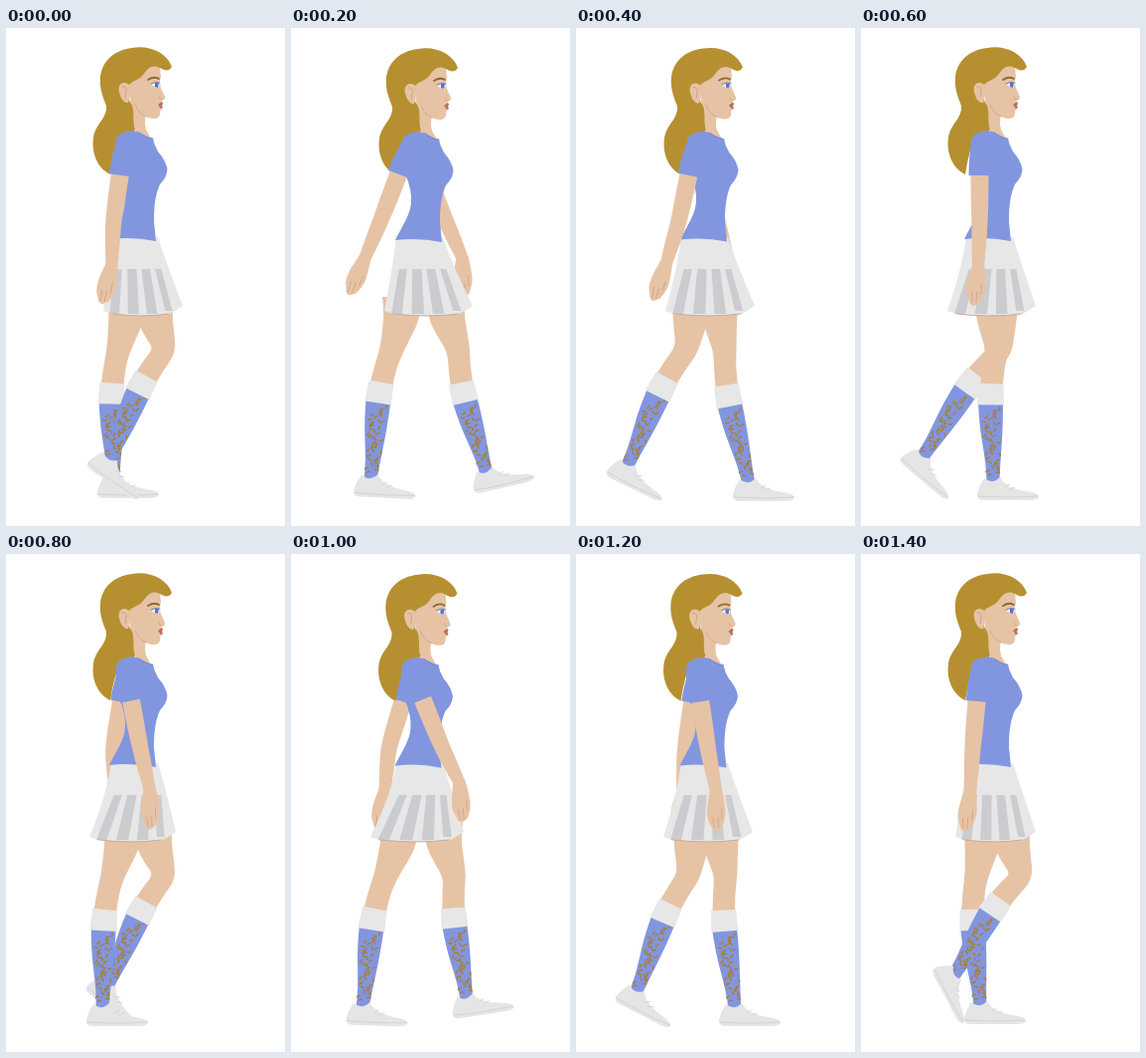
Recreate the animation shown at these times as an HTML page with a canvas. Size 281 by 500 pixels, loop 1.6 s.

```html
<!DOCTYPE html>
<html lang="en">
<head>
<meta charset="utf-8">
<title>Walk cycle</title>
<style>
html, body { margin: 0; width: 100%; height: 100%; overflow: hidden; background: #fff; }
canvas { display: block; width: 281px; height: 500px; }
</style>
</head>
<body>
<canvas id="stage" width="281" height="500"></canvas>
<script>
const ctx = document.getElementById('stage').getContext('2d');
const STEP = 200, COUNT = 8;
const SKIN = '#e7c3a5', SKIN_LINE = '#c79f80', BLUE = '#8296e0', HAIR = '#b69030';
const WHITE = '#e7e7e7', PLEAT = '#cbcbd0', GOLD = '#a5803a';

// Leg poses: hip x, knee x, ankle x, ankle y, foot angle
const nearLeg = [
  [149, 160, 103, 435, 35], [156, 169, 197, 448, -13],
  [144, 150, 174, 458, 0], [134, 137, 133, 457, 0],
  [118, 107, 97, 457, 0], [109, 95, 72, 456, 2],
  [117, 113, 60, 441, 27], [151, 162, 93, 424, 62]
];
const farLeg = [
  [122, 113, 108, 455, 0], [112, 101, 80, 454, 3],
  [116, 111, 51, 441, 26], [139, 141, 61, 432, 40],
  [148, 160, 102, 434, 38], [153, 165, 177, 448, -9],
  [145, 151, 160, 457, 0], [123, 116, 120, 455, 0]
];
// Arm poses: angles of upper arm, forearm and hand, forward positive
const nearArm = [
  [-8, -2, -13], [-21, -23, -22], [-12, -17, -18], [0, -2, -5],
  [11, 13, 2], [22, 26, 6], [9, 11, 2], [-5, -3, -7]
];
const farArm = [
  [4, 6, 0], [23, 24, 3], [14, 15, 4], [3, 4, 0],
  [-10, 3, 0], [-17, -5, -9], [-9, -3, -6], [-2, 2, 0]
];
const hems = [[98, 178], [94, 183], [90, 180], [87, 176], [84, 171], [80, 174], [88, 178], [95, 176]];
const bob = [0, 1, 0.6, 0, 0, 0.7, 0.6, 0];
const sway = [0, 1, 1, 0, 0, 0.5, 0.5, 0];

const rad = a => a * Math.PI / 180;

function fill(path, color) {
  ctx.fillStyle = color;
  ctx.fill(typeof path === 'string' ? new Path2D(path) : path);
}

function line(d, color, width) {
  ctx.strokeStyle = color;
  ctx.lineWidth = width;
  ctx.lineCap = ctx.lineJoin = 'round';
  ctx.stroke(new Path2D(d));
}

function at(x, y, angle, draw) {
  ctx.save();
  ctx.translate(x, y);
  ctx.rotate(rad(angle));
  draw();
  ctx.restore();
}

// Smooth strip through [x, y, width] points
function limb(pts, color) {
  const edge = sign => pts.map(([x, y, w], i) => {
    const a = pts[Math.max(i - 1, 0)], b = pts[Math.min(i + 1, pts.length - 1)];
    const dx = b[0] - a[0], dy = b[1] - a[1], k = sign * w / 2 / Math.hypot(dx, dy);
    return [x - dy * k, y + dx * k];
  });
  const path = new Path2D();
  const trace = side => {
    path.lineTo(...side[0]);
    for (let i = 1; i < side.length - 1; i++) {
      const [x, y] = side[i], n = side[i + 1], last = i === side.length - 2;
      path.quadraticCurveTo(x, y, last ? n[0] : (x + n[0]) / 2, last ? n[1] : (y + n[1]) / 2);
    }
    path.lineTo(...side[side.length - 1]);
  };
  trace(edge(1));
  trace(edge(-1).reverse());
  path.closePath();
  fill(path, color);
}

function shoe() {
  fill('M-9,-5 Q-1,2 7,-6 C12,3 22,6 33,8 Q47,10 46,14 Q45,17 36,17 L-10,17 Q-17,17 -16,10 Q-14,2 -9,-5Z', '#e5e5e6');
  line('M-15,13 Q12,15 45,13', '#cfcfd2', 0.8);
  line('M12,4 L17,1 M17,6 L22,4', '#d2d2d5', 0.8);
}

function specks(shin) {
  let seed = 7;
  const rnd = () => (seed = seed * 16807 % 2147483647) / 2147483647;
  ctx.strokeStyle = GOLD;
  ctx.lineWidth = 1.4;
  ctx.lineCap = 'round';
  ctx.beginPath();
  for (let i = 0; i < 42; i++) {
    const t = 0.44 + 0.5 * (i + rnd()) / 42;
    const [x, y] = shin(t);
    const px = x + (rnd() - 0.5) * (28 - 18 * t), a = rnd() * 6.3;
    const dx = Math.cos(a) * 1.7, dy = Math.sin(a) * 1.7;
    ctx.moveTo(px - dx, y - dy);
    ctx.quadraticCurveTo(px + dy, y - dx, px + dx, y + dy);
  }
  ctx.stroke();
}

function leg([hip, kx, ax, ay, foot]) {
  const ky = 324, dx = ax - kx, dy = ay - ky, len = Math.hypot(dx, dy);
  const shin = t => {
    const bow = 5 * 6.75 * t * (1 - t) ** 2;
    return [kx + dx * t - dy / len * bow, ky + dy * t + dx / len * bow];
  };
  const p = (t, w) => [...shin(t), w];
  limb([[hip, 270, 40], [hip, 288, 37], [(hip + kx) / 2, 306, 30], [kx, ky, 23], p(0.15, 22), p(0.32, 23)], SKIN);
  limb([p(0.39, 25), p(0.55, 24), p(0.78, 17), p(0.93, 13), p(1.02, 13)], BLUE);
  specks(shin);
  limb([p(0.25, 25), p(0.33, 26), p(0.41, 27)], WHITE);
  at(ax, ay, foot, shoe);
}

function hand() {
  fill('M-6,-2 C-8,10 -11,18 -9,29 L-5,38 Q-2,42 1,39 L5,36 Q9,27 9,20 Q8,8 6,-2Z', SKIN);
  line('M-4,27 L-3,37 M1,26 L1,37 M5,18 L5,28', SKIN_LINE, 0.7);
}

function arm(x, y, [upper, fore, palm]) {
  const go = (p, a, len) => [p[0] + Math.sin(rad(a)) * len, p[1] + Math.cos(rad(a)) * len];
  const top = [x, y], elbow = go(top, upper, 83), wrist = go(elbow, fore, 42);
  const cuff = go(top, upper, 34);
  limb([[...go(top, upper, 25), 18], [...go(top, upper, 55), 18], [...elbow, 16],
    [...go(elbow, fore, 20), 15], [...wrist, 12]], SKIN);
  at(...wrist, -palm, hand);
  limb([[...top, 16], [...go(top, upper, 14), 22], [...cuff, 22]], BLUE);
  ctx.beginPath();
  ctx.arc(x, y, 8.5, 0, 7);
  ctx.fillStyle = BLUE;
  ctx.fill();
}

function skirt([l, r]) {
  fill(`M106,208 L153,210 Q160,232 ${r},279 L${r - 6},283 L${r - 13},287 Q${(l + r) / 2},291 ${l + 9},287 L${l},284 Q103,238 106,208Z`, WHITE);
  const mid = f => 102 + f * 59, hem = f => l + f * (r - l);
  for (const [a, b] of [[0.08, 0.2], [0.31, 0.45], [0.55, 0.68], [0.78, 0.87]]) {
    const y = a > 0.7 ? 284 : 287;
    fill(`M${mid(a) + 2},242 L${mid(b) + 3},242 L${hem(b)},${y} L${hem(a)},${y}Z`, PLEAT);
  }
  line(`M${l + 9},287 Q${(l + r) / 2},291 ${r - 14},287`, '#bda996', 0.9);
}

function head() {
  fill('M121,48 L130,103 Q139,110 146,111 L141,102 Q139,94 141,88 L143,90 Q150,92 153,90 Q156,87 155,83 L158,80 L156,78 L158,75 L156,73 Q161,72 160,69 L156,60 Q154,55 156,49 L155,38 L135,30Z', SKIN);
  line('M130,77 Q134,87 142,89', SKIN_LINE, 0.7);
  fill('M127,20 C145,17 162,25 167,39 C164,44 160,43 155,40 C148,36 143,40 139,46 C134,53 128,52 124,57 C125,64 122,72 126,76 C130,82 127,91 130,102 C125,109 115,112 110,123 Q107,134 105,147 C91,140 86,124 88,110 C90,96 102,91 101,78 C97,68 94,60 95,49 C97,33 109,22 127,20Z', HAIR);
  fill('M124,57 C118,52 112,57 114,64 C115,70 119,76 123,75 Q126,66 124,57Z', SKIN);
  line('M117,59 Q122,58 121,64 L120,70', SKIN_LINE, 0.8);
  line('M143,52 Q149,48 154,51', '#8e6a2c', 1.8);
  fill('M146,57 Q151,53 155,55 L154,60 Q150,60 146,57Z', '#eef0fb');
  fill('M150,55 L154,55 L153,60 L150,59Z', '#5872d6');
  line('M146,56 Q151,53 155,55', '#7378bc', 1);
  line('M154,69 Q154,72 157,72', SKIN_LINE, 0.7);
  fill('M153,77 L157,74 L158,76 L157,78 L158,80 L156,81Z', '#b77065');
}

function torso() {
  fill('M122,104 Q130,102 135,105 Q141,109 148,111 Q149,117 153,124 Q161,133 162.500,142 Q162,150 155,157 C150,168 149,181 149,194 L151,214 Q127,209 104,212 C112,196 119,187 120,174 Q121,162 114,145 Q109,124 111,112 Q115,105 122,104Z', BLUE);
  line('M134,105 Q140,111 148,111', '#7387d2', 0.8);
}

function draw(i) {
  ctx.fillStyle = '#fff';
  ctx.fillRect(0, 0, 281, 500);
  const dx = sway[i], dy = bob[i];
  const body = part => at(dx, dy, 0, part);
  body(() => arm(122, 115, farArm[i]));
  leg(farLeg[i]);
  leg(nearLeg[i]);
  skirt(hems[i]);
  body(() => {
    head();
    torso();
    arm(119.5, 114, nearArm[i]);
  });
}

const start = performance.now();
let shown = -1;
function tick() {
  const i = Math.floor((performance.now() - start) / STEP) % COUNT;
  if (i !== shown) draw(shown = i);
  requestAnimationFrame(tick);
}
tick();
</script>
</body>
</html>
```
